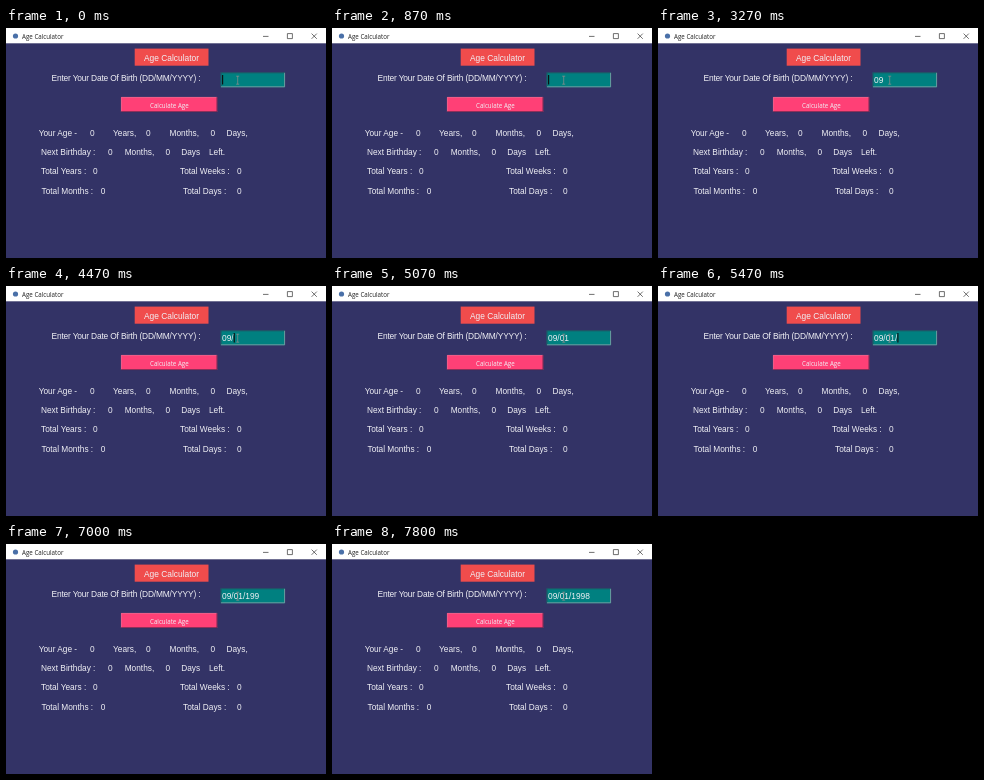
Recreate the animation shown at these times as an HTML page. Size 320 by 230 pixels, loop 8 s.

```html
<!DOCTYPE html>
<html lang="en">
<head>
<meta charset="utf-8">
<title>Age Calculator</title>
<style>
  html, body { margin: 0; width: 100%; height: 100%; overflow: hidden; background: #333366; }
  svg { display: block; width: 320px; height: 230px; }
  text { font: 8.3px "Liberation Sans", Arial, sans-serif; fill: #f0f0f5; }
  .ui { font: 6.2px "Open Sans", sans-serif; }
  .entry { font-size: 8.4px; }
  .line { fill: none; stroke: #333; stroke-width: .7; }
  .edge { fill: none; stroke-width: .8; }
</style>
</head>
<body>
<svg viewBox="0 0 320 230">
  <rect width="320" height="230" fill="#333366"/>

  <!-- title bar -->
  <rect width="320" height="15.3" fill="#fff"/>
  <circle cx="9.5" cy="8" r="2.6" fill="#4a70a8"/>
  <text class="ui" x="16" y="10.8" style="fill:#222">Age Calculator</text>
  <path class="line" d="M257 8.4h5.5M281.4 5.6h5v5h-5zM305.6 5.6l5.2 5.2m0-5.2l-5.2 5.2"/>

  <!-- heading -->
  <rect x="128.7" y="20.6" width="73.8" height="17.1" fill="#f04c4c"/>
  <text class="entry" x="138" y="32.6">Age Calculator</text>

  <!-- date entry -->
  <text class="entry" x="45.5" y="52.8" letter-spacing="-.17">Enter Your Date Of Birth (DD/MM/YYYY) :</text>
  <rect x="214.6" y="44.4" width="64.4" height="14.8" fill="#008080"/>
  <path class="edge" d="M215 59V44.8H279" stroke="#2a4a5c"/>
  <path class="edge" d="M215 58.8H278.6V44.8" stroke="#86a4a8"/>
  <text id="date" class="entry" x="216" y="55"></text>
  <rect id="caret" y="47" width="1.2" height="9.5" fill="#0a1414"/>
  <path d="M230.2 48.2h3M231.7 48.2v8M230.2 56.2h3" fill="none" stroke="#a89090" stroke-width=".6"/>

  <!-- button -->
  <rect x="115" y="69" width="96.3" height="15" fill="#ff4076"/>
  <path class="edge" d="M115.4 84V69.4H211" stroke="#e86890"/>
  <path class="edge" d="M115 83.7H211V69" stroke="#50284c"/>
  <text class="ui" x="144" y="79.6">Calculate Age</text>

  <g id="results"></g>
</svg>
<script>
const LOOP = 8000, TICK = 1000 / 15;
const DATE = "09/01/1998";
const KEY_TIMES = [2260, 2660, 3660, 4530, 4730, 5395, 5995, 6460, 6995, 7260];
const BLINK = 894, BLINK_ON = 595, BLINK_START = 838;

const byId = id => document.getElementById(id);
const date = byId("date"), caret = byId("caret");

// Each row: baseline, then [x, text] pairs.
const rows = [
  [108, [32.7, "Your Age -"], [84, "0"], [107, "Years,"], [140, "0"], [163.5, "Months,"], [204.5, "0"], [220.5, "Days,"]],
  [127, [35, "Next Birthday :"], [102, "0"], [118.7, "Months,"], [159.4, "0"], [175.2, "Days"], [203, "Left."]],
  [146, [35, "Total Years :"], [87, "0"], [174, "Total Weeks :"], [231, "0"]],
  [165.5, [35.5, "Total Months :"], [94.7, "0"], [177, "Total Days :"], [231, "0"]],
];
byId("results").innerHTML = rows.map(([y, ...cells]) =>
  cells.map(([x, label]) => `<text x="${x}" y="${y}">${label}</text>`).join("")).join("");

function draw(now) {
  // The screen updates 15 times a second.
  const t = Math.floor((now % LOOP) / TICK + .01) * TICK;
  const typed = DATE.slice(0, KEY_TIMES.filter(k => k <= t).length);
  if (date.textContent !== typed) date.textContent = typed;
  const end = typed ? date.getComputedTextLength() : 0;
  caret.setAttribute("x", 216 + end);
  const phase = (t - BLINK_START + BLINK) % BLINK;
  caret.setAttribute("visibility", phase < BLINK_ON ? "visible" : "hidden");
}

const start = performance.now();
function frame() {
  draw(performance.now() - start);
  requestAnimationFrame(frame);
}
frame();
</script>
</body>
</html>
```
